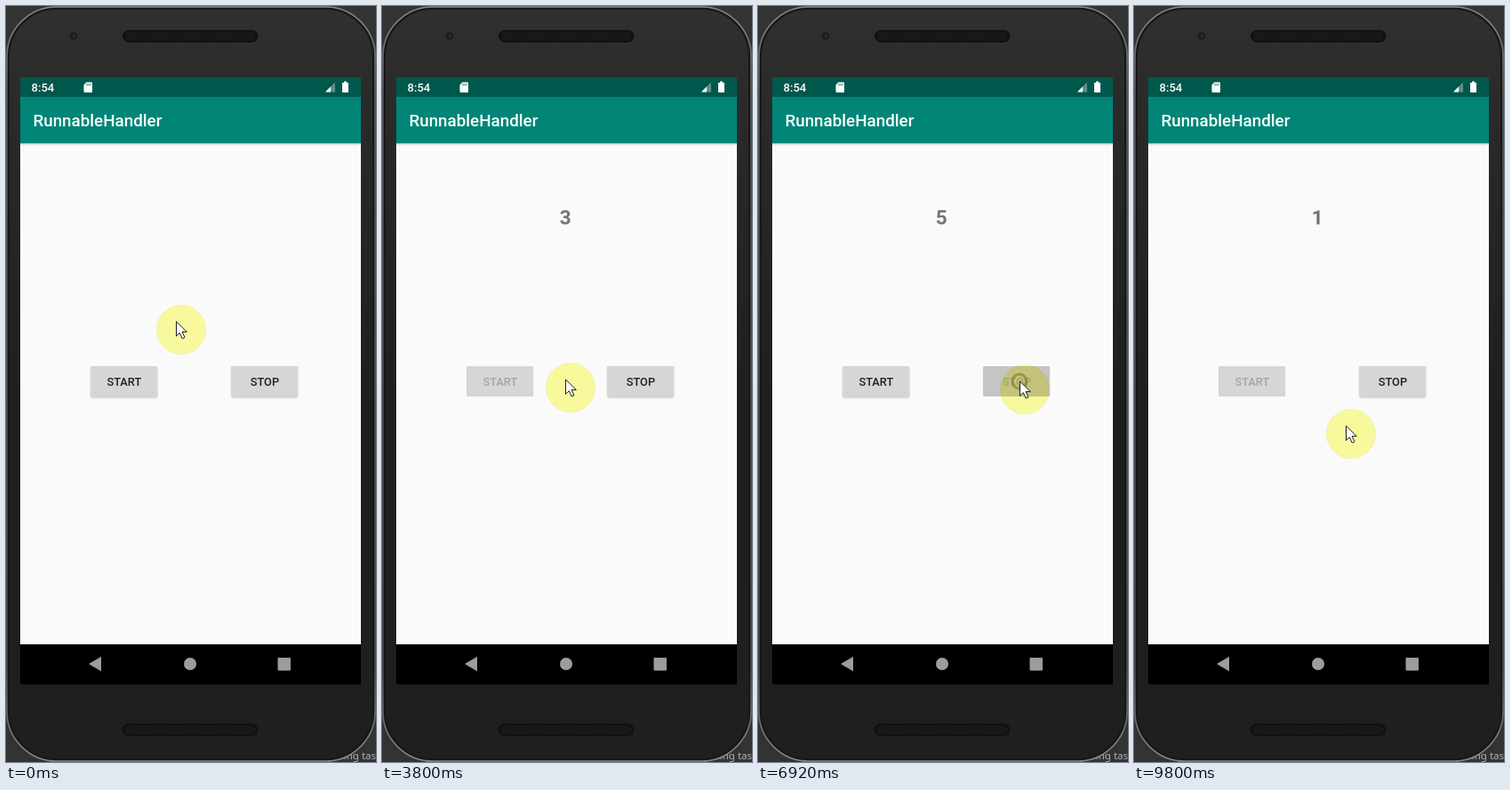
An HTML page for the animation above (9.92 s loop, 416 by 848 pixels).

```html
<!DOCTYPE html>
<html lang="en">
<head>
<meta charset="utf-8">
<title>RunnableHandler</title>
<style>
  html, body { margin: 0; width: 100%; height: 100%; overflow: hidden; background: #333; }
  svg { display: block; width: 416px; height: 848px; }
  text { font-family: Roboto, sans-serif; font-weight: 500; }
  .label { font-size: 12.8px; text-anchor: middle; }
  #taskbar { font: 11.5px "Noto Sans", sans-serif; text-anchor: end; }
  #count { font-size: 22.6px; font-weight: 700; text-anchor: middle; }
  #halo { mix-blend-mode: multiply; }
</style>
</head>
<body>
<svg viewBox="0 0 416 848">
  <defs>
    <linearGradient id="body" x2="0" y2="1">
      <stop offset="0" stop-color="#303032"/>
      <stop offset=".1" stop-color="#2b2b2c"/>
      <stop offset=".5" stop-color="#1f1f1f"/>
      <stop offset="1" stop-color="#1f1f1f"/>
    </linearGradient>
    <linearGradient id="rim" x2="0" y2="1">
      <stop offset="0" stop-color="#8a8a8a"/>
      <stop offset=".12" stop-color="#585858"/>
      <stop offset=".88" stop-color="#505050"/>
      <stop offset="1" stop-color="#8a8a8a"/>
    </linearGradient>
    <linearGradient id="drop" x2="0" y2="1">
      <stop offset="0" stop-opacity=".2"/>
      <stop offset="1" stop-opacity="0"/>
    </linearGradient>
    <pattern id="mesh" width="4" height="4" patternUnits="userSpaceOnUse">
      <path d="M0 0h2v2H0zM2 2h2v2H2z" fill="#1e1e1e"/>
    </pattern>
    <filter id="soft" x="-10%" y="-20%" width="120%" height="150%">
      <feGaussianBlur stdDeviation="1"/>
    </filter>
  </defs>

  <rect width="416" height="848" fill="#333"/>
  <text id="taskbar" x="416" y="845" fill="#b0b0b0">ning tas</text>
  <rect x="1" y="1" width="414" height="846" rx="56" fill="url(#body)" stroke="url(#rim)" stroke-width="1.6"/>
  <rect x="3" y="3" width="410" height="842" rx="54" fill="none" stroke="#181818" stroke-width="2"/>
  <circle cx="76" cy="33.5" r="4.5" fill="#1e1e1f"/>
  <circle cx="76.5" cy="34" r="2" fill="#2c2c2e"/>
  <g id="speakers"></g>

  <rect x="16" y="80" width="383" height="681" fill="#fafafa"/>
  <rect x="16" y="154" width="383" height="3" fill="url(#drop)"/>
  <rect x="16" y="80" width="383" height="22" fill="#00574b"/>
  <rect x="16" y="102" width="383" height="52" fill="#008577"/>
  <rect x="16" y="716" width="383" height="45"/>

  <g fill="#fff">
    <text x="28.5" y="96" font-size="13.1">8:54</text>
    <text x="30.5" y="135" font-size="18.8">RunnableHandler</text>
    <path d="M90.500 85.500h5.500q1 0 1 1v9.500q0 1-1 1h-7.500q-1 0-1-1v-7.500z"/>
    <path d="M370 85.500v11h-11z" opacity=".35"/>
    <path d="M365 90.500v6h-6z"/>
    <path d="M380 84.500h3v1.500h2v11h-7v-11h2z"/>
  </g>
  <path d="M91 87v2.500M93 87v2.500M95 87v2.500" stroke="#00574b" stroke-width=".8"/>
  <g fill="#9c9c9c">
    <path d="M93 738l14-8.200v16.400z"/>
    <circle cx="207" cy="738" r="7"/>
    <rect x="305.5" y="731" width="14.5" height="14.5" rx="1"/>
  </g>

  <text id="count" x="206.3" y="245" fill="#747474"></text>
  <g id="buttons"></g>

  <circle id="halo" r="27.6" fill="#fdfd9f" stroke="#f3f3b4" stroke-width=".7"/>
  <circle id="ring" fill="none" stroke="#77661c" stroke-width="3"/>
  <path id="arrow" d="M0 0v16.300l3.800-3.600 2.900 6.300 2.800-1.300-2.900-6.100h5.200z" fill="#fff" stroke="#1c1c1c" stroke-linejoin="round"/>
</svg>
<script>
const LOOP = 9920;
const $ = id => document.getElementById(id);

// All times below are in tenths of a second.
const home = { x: 197, y: 363 };
// Pointer strokes; sag bows the stroke downwards
const strokes = [
  { from: 1, to: 6, x: 150, y: 430, sag: 20 },
  { from: 10, to: 19, x: 212, y: 428, sag: 0 },
  { from: 19, to: 24, x: 212, y: 428, sag: -6 },
  { from: 39, to: 42, x: 247, y: 434, sag: 0 },
  { from: 44, to: 55, x: 308, y: 430, sag: 52 },
  { from: 57, to: 60, x: 300, y: 430, sag: 0 },
  { from: 70, to: 78, x: 151, y: 432, sag: 6 },
  { from: 86, to: 91, x: 221, y: 500, sag: 32 },
  { from: 91, to: 94, x: 224, y: 497, sag: 0 },
  { from: 95, to: 98, x: 244, y: 480, sag: 0 }
];
// The counter runs between a START click and a STOP click
const runs = [{ from: 8, to: 67 }, { from: 80, to: Infinity }];
const CLICK = 4;

$('speakers').innerHTML = [27, 805].map(y =>
  `<rect x="131" y="${y}" width="152.5" height="14" rx="7" fill="#111"/>
   <rect x="134" y="${y + 2}" width="146" height="10" rx="4" fill="url(#mesh)"/>`).join('');

function button(name, x) {
  $('buttons').insertAdjacentHTML('beforeend',
    `<rect x="${x + .5}" y="405.5" width="74.5" height="34" rx="2" opacity=".22" filter="url(#soft)"/>
     <rect x="${x}" y="404" width="75.2" rx="1"/>
     <text class="label" x="${x + 37.9}" y="426">${name}</text>`);
  const [shadow, face, label] = [...$('buttons').children].slice(-3);
  return (enabled, press) => {
    const grey = 214 - 34 * press;
    shadow.style.display = enabled ? '' : 'none';
    face.setAttribute('height', enabled ? 34.7 : 34);
    face.setAttribute('fill', `rgb(${grey},${grey},${grey})`);
    label.setAttribute('fill', enabled ? '#202020' : '#a5a5a5');
  };
}
const start = button('START', 95);
const stop = button('STOP', 253);

function pointer(k) {
  return strokes.reduce((p, s) => {
    const f = Math.min(1, Math.max(0, (k - s.from) / (s.to - s.from)));
    const ease = 1 - (1 - f) ** 2;
    return {
      x: p.x + (s.x - p.x) * ease,
      y: p.y + (s.y - p.y) * ease + s.sag * Math.sin(Math.PI * f)
    };
  }, home);
}

function draw(t) {
  let k = Math.floor(t / 100);
  if (k % 2 && t % 100 < 20) k--;

  const { x, y } = pointer(k);
  $('halo').setAttribute('transform', `translate(${x} ${y})`);
  $('arrow').setAttribute('transform', `translate(${x - 5.5} ${y - 9})`);

  const run = runs.findLast(r => k >= r.from);
  const running = !!run && k < run.to;
  $('count').textContent = run ? Math.floor((Math.min(k, run.to) - run.from) / 10) : '';

  const age = run ? k - (running ? run.from : run.to) : CLICK;
  const press = Math.max(0, 1 - age / CLICK);
  start(!running, running ? press : 0);
  stop(running || !run, running ? 0 : press);

  const ring = $('ring');
  ring.setAttribute('cx', x - 6);
  ring.setAttribute('cy', y - 9);
  ring.setAttribute('r', 4 + 2 * age);
  ring.setAttribute('opacity', press);
}

const began = performance.now();
(function tick() {
  draw((performance.now() - began) % LOOP);
  requestAnimationFrame(tick);
})();
</script>
</body>
</html>
```
